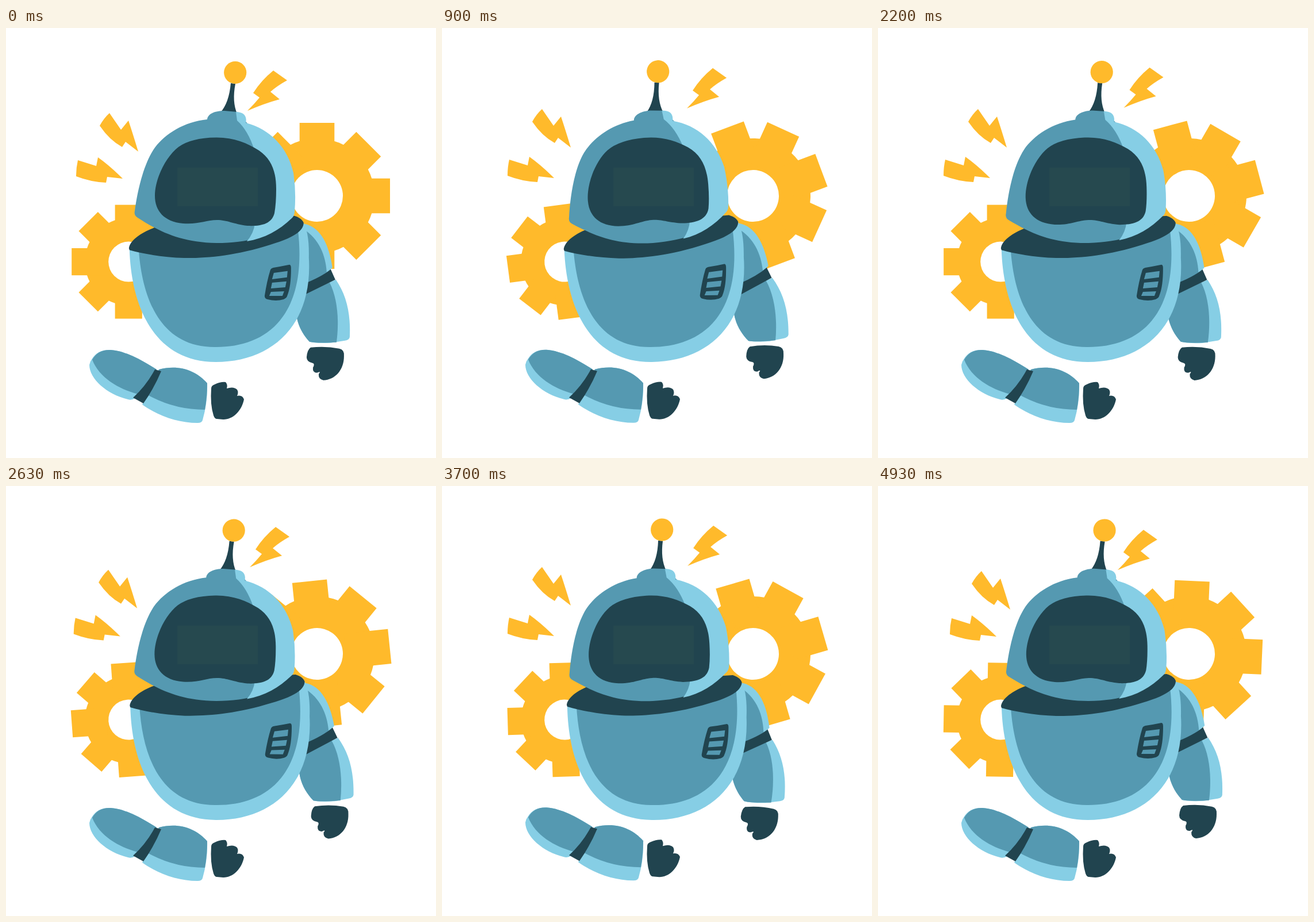
These frames come from a looping animation (748x748 px, 5.01 s). An HTML page:

```html
<!DOCTYPE html>
<html lang="en">
<head>
<meta charset="utf-8">
<title>Robot</title>
<style>
  html, body { margin: 0; width: 100%; height: 100%; overflow: hidden; background: #fff; }
  svg { display: block; width: 100vw; height: 100vh; }
  .y { fill: #ffba2b; }
  .b { fill: #5599b1; }
  .l { fill: #86cee5; }
  .d { fill: #21444f; }
  .w { fill: #fff; }
</style>
</head>
<body>
<svg viewBox="0 0 748 748">
  <g id="bigGear"></g>
  <g id="smallGear"></g>

  <g class="y">
    <path id="bolt1" d="M465 74L489 91Q471 101 460 111L476 124Q450 131 420 144Q432 132 441 121L430 113Q444 91 465 74Z"/>
    <path id="bolt2" d="M180 148L200 177L213 161Q221 185 230 215L208 198L202 207Q180 195 163 170Q170 157 180 148Z"/>
    <path id="bolt3" d="M125 230L157 240L160 225Q181 240 203 262L176 259L174 269Q148 268 122 258Q122 243 125 230Z"/>
  </g>

  <g id="leftArm">
    <path class="l" d="M150 575Q160 559 182 560C210 562 240 580 262 594Q249 624 225 644Q218 648 212 646C175 637 145 610 145 586Q146 580 150 575Z"/>
    <path class="b" d="M150 577Q160 559 182 560C210 562 240 580 262 594Q249 624 230 637C195 628 162 608 150 577Z"/>
    <path class="l" d="M266 594C300 585 330 595 350 618Q351 650 342 682Q341 687 333 687C300 687 265 675 237 655Z"/>
    <path class="b" d="M266 594C300 585 330 595 350 618Q350 642 346 664Q292 664 246 638Z"/>
    <path class="d" d="M259 594L270 597Q258 626 239 653L221 643Q244 622 259 594Z"/>
    <path class="d" d="M357 627Q357 622 363 620Q374 615 382 616Q386 620 384 627Q396 623 402 629Q405 634 402 640Q411 638 414 646C410 666 395 681 378 681L367 680Q363 680 361 674Q355 655 357 627Z"/>
  </g>

  <g id="body">
    <g id="rightArm">
      <path class="l" d="M500 341L520 341C548 347 562 378 568 417Q550 437 510 452Z"/>
      <path class="b" d="M518 350C545 368 556 395 558 425Q540 442 510 452Z"/>
      <path class="l" d="M574 438C592 465 600 495 598 538Q597 543 590 544L565 548Q540 549 528 546C515 532 507 515 505 498L506 462L540 452Z"/>
      <path class="b" d="M563 443C577 470 580 510 575 547Q540 549 528 546C515 532 507 515 505 498L506 462Z"/>
      <path class="d" d="M565 420L573 438L516 466V446Q548 434 565 420Z"/>
      <path class="d" d="M530 556Q556 553 580 558Q589 560 588 571C588 595 573 612 552 613Q543 611 544 602Q549 596 541 600Q533 600 534 591Q538 584 533 583Q523 581 523 573Q524 560 530 556Z"/>
    </g>
    <path class="l" d="M215 385C218 480 255 581 365 581C460 581 534 520 527 400Q528 355 517 338Z"/>
    <path class="b" d="M231 385C236 455 260 555 363 555C450 556 526 505 508 350Z"/>
    <path class="d" d="M214 383C216 368 238 354 262 346L502 327Q515 331 518 339C518 355 495 367 460 377C400 396 350 400.5 310 400C275 399 240 393 215 386Z"/>
    <path class="d" d="M465 417Q479 415 493 412Q496 412 496 418C496 440 494 455 489 467Q488 470 483 472Q470 476 455 472Q450 471 450 466Q454 440 460 421Q461 418 465 417Z"/>
    <path class="b" d="M466 426L490 423L489 434L463 437ZM463 443L488 441L486 451L461 453ZM461 459L484 458L481 466H458Z"/>
  </g>

  <g id="head">
    <path class="d" d="M391 96L399 97Q393 128 402 149L373 147Q388 130 391 96Z"/>
    <circle class="y" cx="398.7" cy="77.5" r="19.6"/>
    <path class="b" d="M350 159C351 149 364 144 380 144L402 146L420 166L500 326C465 364 420 374 366 374C300 373 262 351 229 330Q222 326 224 318C228 288 238 238 259 208C277 184 310 163 350 159Z"/>
    <path class="l" d="M400 146C413 146 420 153 417 165C460 176 490 208 500 252Q505 285 502 320Q501 328 497 331C475 352 450 366 419 371Q431 357 433 340L465 250L432 212Q421 178 402 161Z"/>
    <path class="d" d="M365 190.5C395 190 420 200 440 213C462 228 470 250 470 280Q470 305 467 322C462 342 442 345 420 344C395 341 385 334 367 334C348 334 335 342 308 340C275 337 259 318 259 292C259 262 278 224 300 207Q322 191 365 190.5Z"/>
  </g>
  <rect x="298" y="243" width="140" height="67" fill="#26494f"/>
</svg>
<script>
const $ = id => document.getElementById(id);
const LOOP = 5010, HALF = 2.5;
const BIG = [541, 292], SMALL = [213.2, 406.6];

function buildGear(id, [cx, cy], root, outer, half, hole) {
  let s = `<circle class="y" cx="${cx}" cy="${cy}" r="${root}"/>`;
  for (let a = 0; a < 360; a += 45)
    s += `<rect class="y" x="${cx - half}" y="${cy - outer}" width="${2 * half}" height="${outer - root / 2}" transform="rotate(${a} ${cx} ${cy})"/>`;
  $(id).innerHTML = s + `<circle class="w" cx="${cx}" cy="${cy}" r="${hole}"/>`;
}
buildGear('bigGear', BIG, 100, 127, 30.3, 45);
buildGear('smallGear', SMALL, 76, 99, 23.6, 35);

// Periodic monotone cubic through the given times and values
function track(times, vals) {
  const n = times.length;
  const tAt = i => times[(i + n) % n] + Math.floor(i / n) * HALF;
  const vAt = i => vals[(i + n) % n];
  const slope = i => (vAt(i + 1) - vAt(i)) / (tAt(i + 1) - tAt(i));
  const tangent = i => {
    const a = slope(i - 1), b = slope(i);
    return a * b <= 0 ? 0 : 2 * a * b / (a + b);
  };
  return time => {
    const t = time % HALF;
    let i = n - 1;
    while (i > 0 && times[i] > t + 1e-9) i--;
    const h = tAt(i + 1) - tAt(i), u = (t - tAt(i)) / h, v = 1 - u;
    return v * v * (1 + 2 * u) * vAt(i) + u * u * (3 - 2 * u) * vAt(i + 1)
      + h * u * v * (v * tangent(i) - u * tangent(i + 1));
  };
}

const KEYS = [0, .4, .6, 1.4, 1.8, 2.2, 2.45];
const bigTurn = track(KEYS, [0, -15, -23.1, -15, -15.4, -15, 2.5]);
const smallTurn = track(KEYS, [0, -10, -11, 0, -18.5, 0, 1]);
const bolt1 = track(KEYS, [0, 1, .72, 1, 1, 1, -.42]);
const bolt2 = track(KEYS, [0, 1, 1, 1, 1, 1, 0]);
const bolt3 = track(KEYS, [0, 1, 1, 1, 1, 1, -.38]);
const leftLift = track(KEYS, [0, 0, 0, -.8, 0, 0, 0]);
const headSway = track([0, .4, .6, .85, 1.1, 1.4, 1.8, 2.2, 2.45],
                       [0, -12, -21.5, -23, -21, -4, -18, -9.5, -4.7]);

const wave = (t, cycles, phase) => Math.sin(2 * Math.PI * (cycles * t / 5 + phase / 360));
const move = (id, x, y) => $(id).setAttribute('transform', `translate(${x} ${y})`);
const turn = (id, deg, [x, y]) => $(id).setAttribute('transform', `rotate(${deg} ${x} ${y})`);

function draw(ms) {
  const m = ms % LOOP;
  const step = Math.min(99, 2 * Math.floor(m / 100) + (m % 100 >= 30 ? 1 : 0));
  const t = step * .05;

  turn('bigGear', bigTurn(t), BIG);
  turn('smallGear', smallTurn(t), SMALL);

  const p = bolt1(t), q = bolt2(t), r = bolt3(t);
  move('bolt1', 7.5 * p, -5.3 * p);
  move('bolt2', -6 * q, -7 * q);
  move('bolt3', -8 * r, -Math.max(0, r));

  move('leftArm', 0, leftLift(t));
  turn('body', .286 * (.3 - 2.7 * wave(t, 1, 10.8)), [365, 580]);
  turn('rightArm', -.263 * (2.6 + 6.3 * wave(t, 3, 205)), [537, 365]);
  turn('head', .2018 * headSway(t), [365, 361]);
}

const start = performance.now();
function tick() {
  draw(performance.now() - start);
  requestAnimationFrame(tick);
}
draw(0);
requestAnimationFrame(tick);
</script>
</body>
</html>
```
